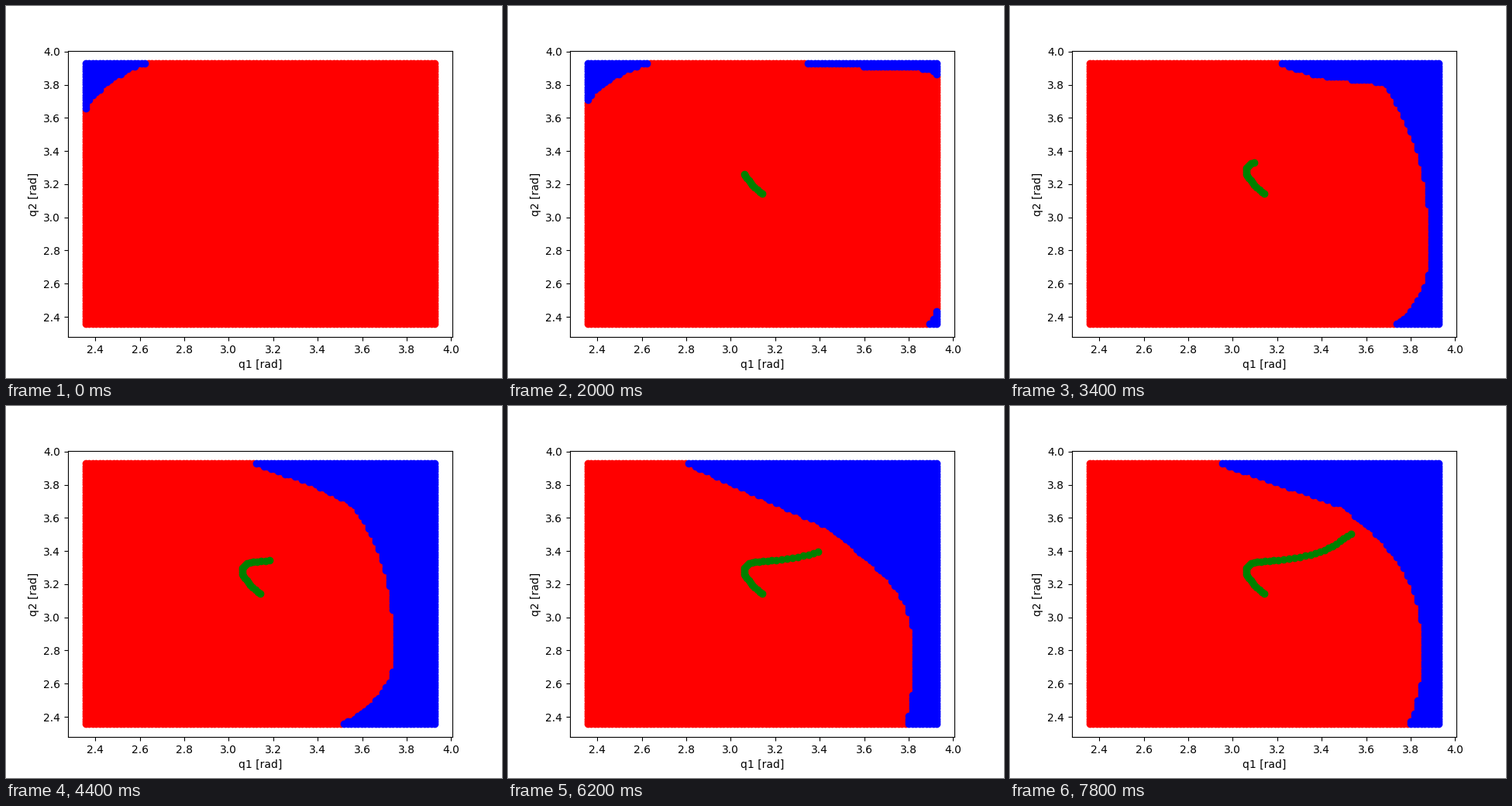
Recreate the animation shown at these times as a matplotlib script. Size 640x480 px, loop 8000 ms.

```python
import numpy as np
import matplotlib.pyplot as plt
from matplotlib.animation import FuncAnimation

FRAMES, STEP_MS = 40, 200
N = 101                    # grid points per axis
LOW, HIGH = 0.75 * np.pi, 1.25 * np.pi
BULGE = 72                 # row where the right border lies furthest out

# Left region: frame, width, height
LEFT = np.array([
    (0, 17.4, 17.4), (3, 52, 94.5), (6, 33.3, 32.7), (10, 17.4, 14.5),
    (14, 0, 1),
])

# Right region: frame, top column, two bends (column, row), bulge and bottom
RIGHT = np.array([
    (0, 138, 171, 2, 175.4, 3.6, 178, 173.5),
    (10, 63, 96, 2, 100.4, 3.6, 103, 98.5),
    (17, 55, 65, 4.5, 85, 7.5, 98, 88.5),
    (22, 49, 66, 8, 77, 15.5, 89, 74),
    (28, 23, 66, 24, 82, 43, 91, 86),
    (31, 29, 70.5, 25, 86, 43, 94, 92),
    (39, 38, 73, 16.2, 80, 24, 96, 92),
])

# Path: frame, q1, q2
PATH = np.array([
    (1, np.pi, np.pi), (6, 3.089, 3.207), (11, 3.060, 3.275),
    (17, 3.095, 3.330), (22, 3.185, 3.343), (31, 3.394, 3.395),
    (39, 3.532, 3.502),
])

rows = cols = np.arange(N)


def blend(keys, frame):
    return [np.interp(frame, keys[:, 0], column) for column in keys[:, 1:].T]


def left_border(frame, power=0.75):
    """Columns below this are blocked: a concave superellipse corner."""
    width, height = blend(LEFT, frame)
    down = np.clip(rows / height, 0, 1)
    return width * (1 - down ** power) ** (1 / power)


def right_border(frame):
    """Two straight runs, an eased side, then a curl back at the bottom."""
    top, x1, y1, x2, y2, bulge, bottom = blend(RIGHT, frame)
    runs = np.interp(rows, [0, y1, y2], [top, x1, x2])
    side = np.clip((rows - y2) / (BULGE - y2), 0, 1)
    curl = np.clip((rows - BULGE) / (N - 1 - BULGE), 0, 1)
    return (runs + (bulge - x2) * (1 - (1 - side) ** 2.5)
            + (bottom - bulge) * curl ** 2.5)


def smooth_path(t):
    """Cubic Hermite curve through the path points."""
    knots, points = PATH[:, 0], PATH[:, 1:]
    slope = np.gradient(points, knots, axis=0)
    i = np.clip(np.searchsorted(knots, t, side="right") - 1, 0, len(knots) - 2)
    h = (knots[i + 1] - knots[i])[:, None]
    s = (t - knots[i])[:, None] / h
    return ((1 + 2 * s) * (1 - s) ** 2 * points[i]
            + s * (1 - s) ** 2 * h * slope[i]
            + s ** 2 * (3 - 2 * s) * points[i + 1]
            - s ** 2 * (1 - s) * h * slope[i + 1])


q = np.linspace(LOW, HIGH, N)
q1, q2 = np.meshgrid(q, q[::-1])
grid = np.dstack([q1, q2])
trail = smooth_path(np.arange(1, FRAMES))

fig, ax = plt.subplots(figsize=(6.4, 4.8), dpi=100)
free = ax.scatter(q1, q2, color="red")
ax.set_xlim(ax.get_xlim())
ax.set_ylim(ax.get_ylim())
blocked = ax.scatter([], [], color="blue")
path = ax.scatter([], [], color="green")
ax.set_xlabel("q1 [rad]")
ax.set_ylabel("q2 [rad]")


def update(frame):
    blue = ((cols < left_border(frame)[:, None])
            | (cols >= right_border(frame)[:, None] - 0.5))
    free.set_offsets(grid[~blue])
    blocked.set_offsets(grid[blue])
    path.set_offsets(trail[:frame])
    return free, blocked, path


anim = FuncAnimation(fig, update, frames=FRAMES, interval=STEP_MS,
                     repeat=True, repeat_delay=0)
plt.show()
```
